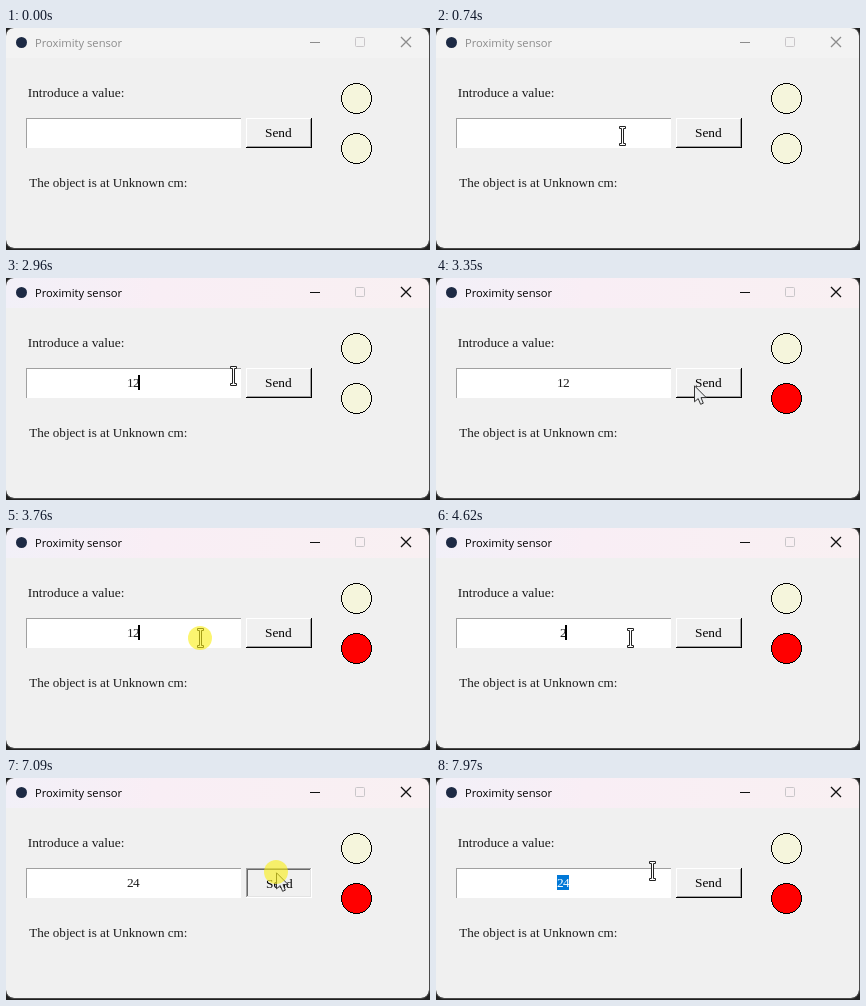
An HTML page that plays this animation: 424 by 222 pixels, repeating every 8 s.

```html
<!DOCTYPE html>
<html lang="en">
<head>
<meta charset="utf-8">
<title>Proximity sensor</title>
<style>
  html, body { margin: 0; width: 100%; height: 100%; overflow: hidden; background: #202020; }
  svg { display: block; width: 100vw; height: 100vh; }
  text { font-family: "Liberation Serif", "Times New Roman", serif; font-size: 13.33px; fill: #1c1c1c; white-space: pre; }
  #title { font-family: "Open Sans", "Noto Sans", sans-serif; font-size: 11.2px; }
  #value { letter-spacing: -.65px; }
  #label { fill: #000; }
  .crisp { shape-rendering: crispEdges; }
</style>
</head>
<body>
<svg viewBox="0 0 424 222">
  <defs>
    <linearGradient id="mica">
      <stop offset="0" stop-color="#f2f0f8"/>
      <stop offset=".35" stop-color="#f9eef5"/>
      <stop offset="1" stop-color="#f9f0f2"/>
    </linearGradient>
    <clipPath id="frame"><rect width="423" height="220" rx="8"/></clipPath>
  </defs>
  <rect width="424" height="222" fill="#202020"/>
  <g clip-path="url(#frame)">
    <rect width="424" height="222" fill="#f0f0f0"/>
    <rect id="bar" width="424" height="30"/>
  </g>
  <rect x="-.5" y="-.5" width="424" height="221" rx="8.5" fill="none" stroke="#4a4a4a"/>

  <circle cx="15.5" cy="14.5" r="5.5" fill="#1d2a44"/>
  <text id="title" x="29" y="18.7">Proximity sensor</text>
  <g id="controls" fill="none">
    <path d="M304 14.5h10" class="crisp"/>
    <path d="M395 9l10 10m0-10l-10 10" stroke-width="1.3"/>
  </g>
  <rect x="349.5" y="9.5" width="9" height="9" rx="1" fill="none" stroke="#c9c6c9"/>

  <text x="21.7" y="69" style="font-size:13.4px">Introduce a value:</text>
  <text x="23.2" y="159" style="font-size:13.1px">The object is at Unknown cm:</text>

  <g class="crisp">
    <rect x="20" y="90" width="215" height="30" fill="#fff"/>
    <path d="M20.5 120V90.5H235" fill="none" stroke="#a0a0a0"/>
    <rect id="selection" y="97" height="15" fill="#0078d7"/>
  </g>
  <text id="value" y="109"></text>
  <rect id="caret" y="97" width="2" height="15" class="crisp"/>

  <g id="raised" class="crisp" fill="none">
    <path d="M240.5 119V90.5H305" stroke="#fff"/>
    <path d="M241 118.5H304.5V91" stroke="#a0a0a0"/>
    <path d="M240 119.5H305.5V90" stroke="#000"/>
  </g>
  <g id="sunken" class="crisp" fill="none">
    <path d="M240.5 119V90.5H305" stroke="#a0a0a0"/>
    <path d="M241.5 118V91.5H304" stroke="#696969"/>
    <path d="M241 118.5H304.5V91" stroke="#e3e3e3"/>
    <path d="M240 119.5H305.5V90" stroke="#fff"/>
  </g>
  <text id="label" y="109">Send</text>

  <g stroke="#000" class="crisp">
    <circle cx="350.5" cy="70.5" r="15" fill="#f5f5dc"/>
    <circle id="lamp" cx="350.5" cy="120.5" r="15"/>
  </g>

  <g id="pointer">
    <path id="arrow" d="M.5 .8V16.8L4.2 13.6L6.6 19.3L9.3 18.2L7 12.6H12.2Z" fill="#eceef0" stroke="#333" stroke-linejoin="round"/>
    <path id="beam" d="M-2.5 -9.5H3.5V-7.5H1.5V7.5H3.5V9.5H-2.5V7.5H-.5V-7.5H-2.5Z" fill="#fff" stroke="#222"/>
    <circle id="ring" r="12" fill="#faee10" opacity=".6"/>
  </g>
</svg>
<script>
const LOOP = 8000, STEP = 65, FOCUS = 750, SELECT_END = 4620;
const el = id => document.getElementById(id);

// Start time, number of steps, destination
const start = [246, 236];
const moves = [
  [200, 8, 186, 108], [2740, 1, 190, 97], [2890, 4, 264, 98], [3280, 2, 258, 107],
  [3420, 5, 194, 110], [6810, 4, 270, 94], [7360, 3, 216, 93]
];
const typed = [[1810, "1"], [2210, "12"], [SELECT_END, "2"], [6080, "24"]];
const blinks = [[FOCUS, 1350], [1680, 2280], [2610, 3210], [3510, 4090],
  [4420, 5020], [5350, 5950], [6280, 6880], [7160, 7760]];
const presses = [[3150, 3220], [7090, 7160]];
const clicks = [[FOCUS, 880], ...presses, [3760, 3830], [7760, 7830], [7900, 7970]];
const selections = [[3830, SELECT_END], [7900, LOOP]];

const during = (spans, t) => spans.some(([a, b]) => t >= a && t < b);
const show = (id, on) => el(id).setAttribute("visibility", on ? "visible" : "hidden");
const set = (id, attrs) => {
  for (const name in attrs) el(id).setAttribute(name, attrs[name]);
};

function pointerAt(t) {
  let [x, y] = start;
  for (const [from, steps, toX, toY] of moves) {
    if (t < from) break;
    const p = Math.min(1, (Math.floor((t - from) / STEP) + 1) / steps);
    x += (toX - x) * p;
    y += (toY - y) * p;
  }
  return [Math.round(x), Math.round(y)];
}

function drawWindow(t) {
  const active = t >= FOCUS;
  set("bar", { fill: active ? "url(#mica)" : "#f3f3f3" });
  el("title").style.fill = active ? "#000" : "#8c8c8c";
  set("controls", { stroke: active ? "#111" : "#8c8c8c" });
}

function drawEntry(t) {
  const value = typed.reduce((now, [at, text]) => t >= at ? text : now, "");
  const selected = during(selections, t);
  const left = 127 - 3 * value.length;
  el("value").textContent = value;
  el("value").style.fill = selected ? "#fff" : "#1c1c1c";
  set("value", { x: left });
  set("selection", { x: left, width: 6 * value.length });
  show("selection", selected);
  set("caret", { x: 126 + 3 * value.length });
  show("caret", during(blinks, t));
}

function drawButton(t) {
  const down = during(presses, t);
  show("raised", !down);
  show("sunken", down);
  set("label", { x: down ? 260 : 259, y: down ? 110 : 109 });
  set("lamp", { fill: t >= presses[0][1] ? "#f00" : "#f5f5dc" });
}

function drawPointer(t) {
  const [x, y] = pointerAt(t);
  const visible = t >= moves[0][0];
  const overEntry = x > 20 && x < 235 && y > 90 && y < 120;
  set("pointer", { transform: `translate(${x} ${y})` });
  show("arrow", visible && !overEntry);
  show("beam", visible && overEntry);
  show("ring", during(clicks, t));
}

function draw(t) {
  drawWindow(t);
  drawEntry(t);
  drawButton(t);
  drawPointer(t);
}

const origin = performance.now();
function tick() {
  draw((performance.now() - origin) % LOOP);
  requestAnimationFrame(tick);
}
draw(0);
requestAnimationFrame(tick);
</script>
</body>
</html>
```
